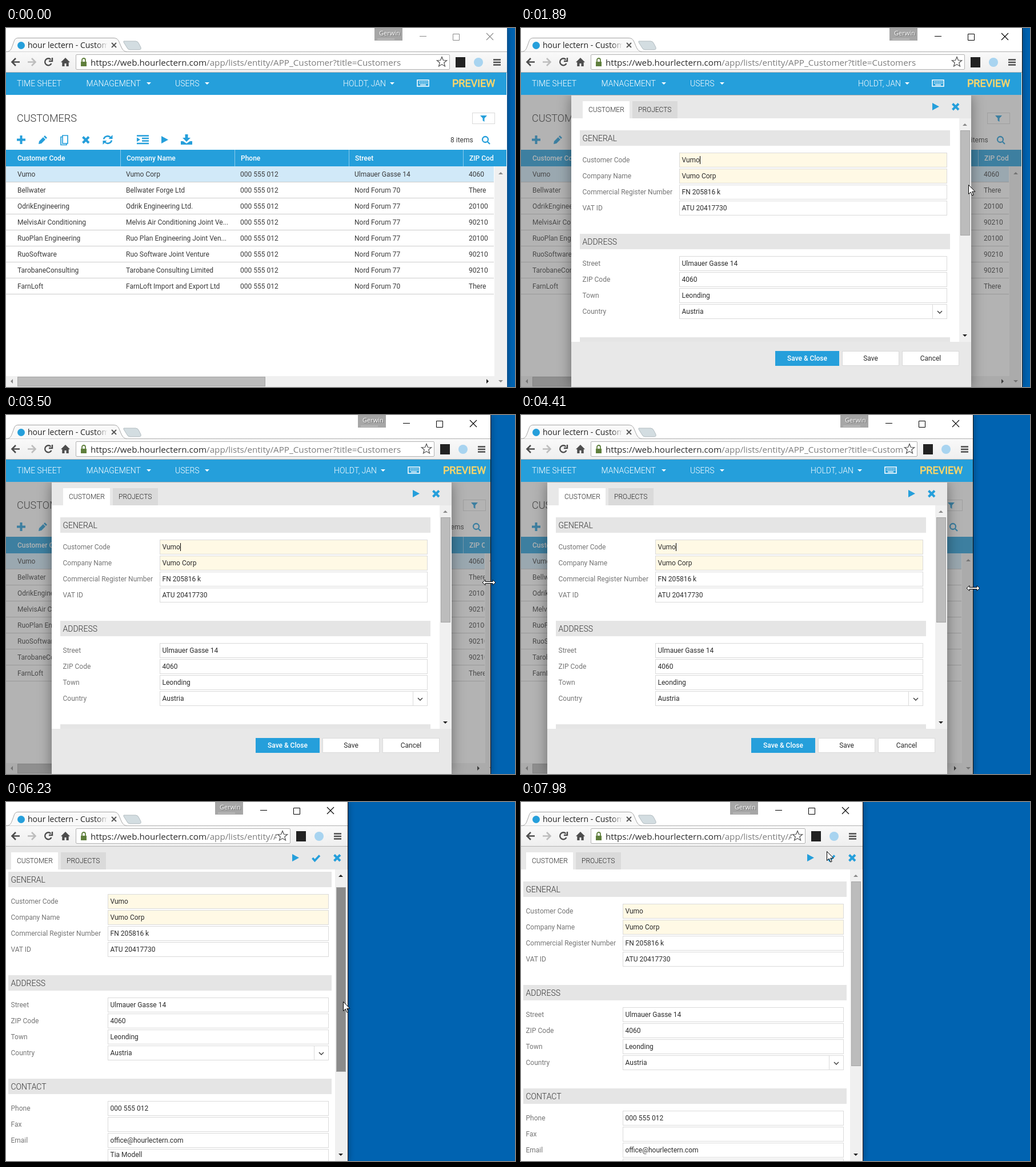
Recreate the animation shown at these times as an HTML page. Size 891 by 628 pixels, loop 8000 ms.

```html
<!DOCTYPE html>
<html lang="en">
<head>
<meta charset="utf-8">
<title>Customer form</title>
<style>
html, body { margin: 0; width: 100%; height: 100%; overflow: hidden; background: #0063b1; }
body { position: relative; font: 12px/20px Roboto, sans-serif; color: #3a3a3a; }
div, span, svg { position: absolute; box-sizing: border-box; }
span { white-space: pre; }
svg { overflow: visible; fill: currentColor; }
svg.line { fill: none; stroke: currentColor; }
.fill { inset: 0; }
.clip { overflow: hidden; }
.blue { color: #259fdb; }
.white { color: #fff; }
.dark { color: #222; }
.grey { color: #555; }
.faint { color: #bdbdbd; }
.pale { color: #a8d4f0; }
.bold { font-weight: 500; }
.nav { font-size: 14px; font-weight: 300; color: #fff; }
.head { font-size: 14px; font-weight: 300; color: #333; }
.title { font-size: 18px; font-weight: 300; color: #333; }
.label { color: #757575; }

#win { left: 0; top: 0; height: 628px; overflow: hidden; background: #fff;
  box-shadow: 1px 0 0 #15528c, 2px 0 9px rgba(0,0,0,.28); }
#win.active { box-shadow: 1px 0 0 #111, 2px 0 10px rgba(0,0,0,.3); }
#controls { color: #8a8a8a; }
.active #controls { color: #000; }
#user { background: #a6a6a6; }
#user span { font: 11px/20px "Open Sans", sans-serif; color: #fff; text-shadow: 1px 1px 1px #666; }
.strip { background: #b5b5b5; }
.rule { background: #b0b0b0; }
.tabShape { fill: #f9f9f9; stroke: #a5a5a5; }
.newTab { fill: #d3dde1; stroke: #b3bcc0; }
.tab { font: 14px/20px "Open Sans", sans-serif; color: #222; width: 140px; overflow: hidden;
  -webkit-mask: linear-gradient(90deg, #000 120px, transparent); mask: linear-gradient(90deg, #000 120px, transparent); }
#tools { left: 0; top: 42px; height: 36px; background: linear-gradient(#f9f9f9, #efefef); border-bottom: 1px solid #b4b4b4; color: #4d4d4d; }
.omni { background: #fff; border: 1px solid #b2b2b2; border-radius: 2px; }
.lock { color: #5f7f3c; }
.url { font: 15.2px/20px "Open Sans", sans-serif; color: #2b2b2b; }
.url i { font-style: normal; color: #7d7d7d; }

#page { left: 0; top: 0; height: 628px; }
.navbar, .thead, .primary { background: #259fdb; }
.preview { font-size: 18px; color: #ffd768; -webkit-text-stroke: .6px #ffd768; }
.keys { stroke-dasharray: 1.6 1.2; }
.row { border-bottom: 1px solid #ccc; }
.row:first-child { background: #d1e9f8; }
.col { background: #8ccbec; }
.track { background: #f0f0f0; color: #888; }
.thumb { background: #bcbcbc; border: 1px solid #a6a6a6; }
.frame { background: #fff; border: 1px solid #dadada; }
.split { background: #dadada; }
#shade { left: 0; right: 0; top: 117px; bottom: 0; background: rgba(90,90,90,.46); }

#modal { bottom: 0; background: #e8e8e8; box-shadow: 0 0 22px rgba(0,0,0,.4); clip-path: inset(0 -40px 0 -40px); }
#body { left: 0; right: 0; top: 40px; bottom: 79px; background: #fff; overflow: hidden; }
#bar { right: 0; width: 21px; top: 0; bottom: 0; }
#thumb { left: 2px; width: 17px; height: 184px; }
#form { left: 0; right: 0; top: 0; }
.tabOn { background: #fff; }
.tabOff { background: #dadada; }
.caption { font-weight: 300; color: #222; }
.band { background: #e5e5e5; }
.need { background: #fff9e5; }
.field, .btn { color: #2c2c2c; }
.btn { text-align: center; line-height: 24px; }
.primary { text-align: center; line-height: 26px; color: #fff; font-weight: 500; }
#tick { display: none; }
.compact #body { bottom: 0; }
.compact #foot { display: none; }
.compact #bar { right: 10px; }
.compact #thumb { height: 323px; }
.compact #tick { display: block; }
.compact #play { margin-left: -38px; }
#caret { display: inline-block; width: 1px; height: 14px; background: #000; vertical-align: -3px; }
#pointer, #resize { left: 0; top: 0; width: 1px; height: 1px; fill: #fff; stroke: #000; }
</style>
</head>
<body>
<script>
// Negative x counts from the right edge; a width of 0 or less is a right inset.
const px = x => x < 0 ? `calc(100% - ${-x}px)` : `${x}px`;
const text = (x, y, s, cls = '') =>
  `<span class="${cls}" style="left:${px(x)};top:${y - 10}px">${s}</span>`;
const box = (x, y, w, h, cls = '', inner = '', id = '') =>
  `<div id="${id}" class="${cls}" style="left:${px(x)};top:${px(y)};${w > 0 ? 'width:' + w : 'right:' + -w}px;height:${h}px">${inner}</div>`;
const icon = (x, y, d, cls = '', stroke = 0, id = '') =>
  `<svg id="${id}" class="${cls}${stroke ? ' line' : ''}" style="left:${px(x)};top:${px(y)}" width="1" height="1" stroke-width="${stroke || 1}"><path d="${d}"/></svg>`;

const PLAY = 'M0 0L12 6.5 0 13z';
const CROSS = 'M1.5 1.5L12 12M12 1.5L1.5 12';
const DOWN = 'M0 0h8l-4 4z';
const UP = 'M0 4h8L4 0z';

function chrome() {
  const controls =
    icon(-153, 15, 'M0 -.5h12', '', 1) +
    icon(-95, 10, 'M.5 .5h11v11h-11z', '', 1) +
    icon(-36, 9, 'M0 0l12 12M12 0L0 12', '', 1.1);
  const tools =
    icon(9, 10, 'M15 7.5H2M8 1L1.5 7.5 8 14', '', 2.6) +
    icon(38, 10, 'M0 7.5h13M7 1l6.5 6.5L7 14', 'faint', 2.6) +
    icon(67, 10, 'M12.5 10A6 6 0 1 1 11.5 3.2M14 0v6H8', '', 2.4) +
    icon(96, 10, 'M8 0l8 8h-2.3v7H9.5v-5h-3v5H2.3V8H0z') +
    box(122, 4, -100, 27, 'omni') +
    icon(131, 10, 'M0 7h10v8H0z', 'lock') +
    icon(131, 10, 'M2 7V4a3 3 0 0 1 6 0v3', 'lock', 1.8) +
    box(148, 5, -124, 25, 'clip', text(0, 12.5,
      'https://web.hourlectern.com<i>/app/lists/entity/APP_Customer?title=Customers</i>', 'url')) +
    icon(-114, 17, 'M0 -8.5l2.4 6 6.3.3-4.9 4 1.7 6.2L0 4.6-5.5 8l1.7-6.2-4.9-4 6.3-.3z', '', 1.2) +
    icon(-90, 9, 'M0 0h17v18H0z', 'dark') +
    icon(-58, 17.5, 'M0 0a8 8 0 1 0 16 0a8 8 0 1 0-16 0', 'pale') +
    icon(-24, 12, 'M0 1.5h13M0 6h13M0 10.5h13', '', 2.6);
  return box(0, 41, 0, 1, 'rule') +
    icon(0, 17, 'M0 24.5C8 24.5 9 20 12 12S15 .5 22 .5H188C196 .5 197 5 200 12S205 24.5 212 24.5', 'tabShape') +
    icon(205, 22, 'M1 1h21q4 0 6 5l3 6q1 4-3 4H12q-4 0-6-5L1 3z', 'newTab') +
    icon(20, 23.5, 'M0 6.5a6.5 6.5 0 1 0 13 0a6.5 6.5 0 1 0-13 0', 'blue') +
    text(38, 30, 'hour lectern - Customers', 'tab') +
    icon(185, 26, 'M0 0l8 8M8 0L0 8', 'grey', 1.8) +
    box(-232, 0, 49, 22, '', box(5, 18, 30, 3, 'strip') + text(8, 9, 'Gerwin'), 'user') +
    `<div id="controls" class="fill">${controls}</div><div id="tools">${tools}</div>`;
}

function nav() {
  const user = 'HOLDT, JAN';
  const wide = text(19, 97, 'TIME SHEET', 'nav') +
    text(140.5, 97, 'MANAGEMENT', 'nav') + icon(246, 95, DOWN, 'white') +
    text(296, 97, 'USERS', 'nav') + icon(348, 95, DOWN, 'white') +
    text(-286, 97, user, 'nav') + icon(-204, 95, DOWN, 'white') +
    icon(-157, 90, 'M1 1h20v11H1z', 'white', 1.6) +
    icon(-157, 90, 'M4 4h15M4 6.7h15', 'white keys', 1.6) +
    icon(-157, 90, 'M6 9.5h10', 'white', 1.6) +
    text(-95, 97, 'PREVIEW', 'preview');
  const narrow = icon(19, 92, 'M0 1.2h12M0 5.2h12M0 9.2h12', 'white', 2) +
    text(-110, 97, user, 'nav') + icon(-27, 95, DOWN, 'white');
  return box(0, 78, 0, 39, 'navbar') +
    `<div id="wide" class="fill">${wide}</div><div id="narrow" class="fill">${narrow}</div>`;
}

function list() {
  const phone = '000 555 012', s70 = 'Nord Forum 70', s77 = 'Nord Forum 77';
  const rows = [
    ['Vumo', 'Vumo Corp', 'Ulmauer Gasse 14', '4060'],
    ['Bellwater', 'Bellwater Forge Ltd', s70, 'There'],
    ['OdrikEngineering', 'Odrik Engineering Ltd.', s77, '20100'],
    ['MelvisAir Conditioning', 'Melvis Air Conditioning Joint Ve...', s77, '90210'],
    ['RuoPlan Engineering', 'Ruo Plan Engineering Joint Ven...', s77, '20100'],
    ['RuoSoftware', 'Ruo Software Joint Venture', s77, '90210'],
    ['TarobaneConsulting', 'Tarobane Consulting Limited', s77, '90210'],
    ['FarnLoft', 'FarnLoft Import and Export Ltd', s70, 'There'],
  ];
  const cells = ([code, name, street, zip], i) => box(0, 28 * i, 0, 28, 'row',
    [code, name, phone, street, zip].map((s, c) => text(c ? 10 + 200 * c : 20, 14, s)).join(''));
  const heads = ['Customer Code', 'Company Name', 'Phone', 'Street', 'ZIP Code'].map((s, c) =>
    text(c ? 11 + 200 * c : 20, 15, s, 'white bold') + (c ? box(200 * c, 0, 1, 29, 'col') : '')).join('');
  return text(19, 158, 'CUSTOMERS', 'title') +
    box(-60, 148, 40, 20, 'frame') + icon(-46, 153, 'M0 0h12L7.5 5v6l-3-2V5z', 'blue') +
    icon(19, 188, 'M0 7.5h15M7.5 0v15', 'blue', 4) +
    icon(57, 188, 'M0 15l1-5 7-7 4 4-7 7zM9 2l2-2 4 4-2 2z', 'blue') +
    icon(95, 187, 'M4 1h9v14H4zM4 3.5H1V17.5h10V15', 'blue', 1.7) +
    icon(133, 189, CROSS, 'blue', 4) +
    icon(169, 187, 'M2 7.5A7 7 0 0 1 14 4.5M16 9.5A7 7 0 0 1 4 12.5', 'blue', 2.6) +
    icon(169, 187, 'M17.5 0v7h-7zM.5 17v-7h7z', 'blue') +
    icon(229, 187, 'M0 1.5h21M9 6h12M9 10.5h12M0 15h21', 'blue', 2.6) +
    icon(229, 187, 'M0 4.5l6 3.8-6 3.8z', 'blue') +
    icon(272, 189, PLAY, 'blue') +
    icon(306, 186, 'M7.5 0h5v6h4.5l-7 7-7-7h4.5zM0 12h4l6 4 6-4h4v6H0z', 'blue') +
    text(-98, 196, '8 items') +
    icon(-43, 189, 'M11 6a5 5 0 1 1-10 0a5 5 0 1 1 10 0M9.5 9.5L14 14', 'blue', 2.3) +
    box(0, 213, 0, 29, 'thead', box(0, 0, -22, 29, 'clip', heads)) +
    box(0, 242, -22, 367, 'clip', rows.map(cells).join('')) +
    box(-21, 242, 21, 386, 'track', icon(7, 10, UP) + icon(7, 374, DOWN)) +
    box(0, 609, -21, 19, 'track', icon(8, 5, 'M4 0v8L0 4z') +
      box(20, 1, 434, 17, 'thumb') + icon(-14, 5, 'M0 0v8l4-4z', 'dark'));
}

function form() {
  const sections = [
    ['GENERAL', [['Customer Code', 'Vumo<i id="caret"></i>'], ['Company Name', 'Vumo Corp'],
      ['Commercial Register Number', 'FN 205816 k'], ['VAT ID', 'ATU 20417730']]],
    ['ADDRESS', [['Street', 'Ulmauer Gasse 14'], ['ZIP Code', '4060'], ['Town', 'Leonding'], ['Country', 'Austria']]],
    ['CONTACT', [['Phone', '000 555 012'], ['Fax', ''], ['Email', 'office@hourlectern.com'], ['', 'Tia Modell']]],
  ];
  return sections.map(([name, fields], s) => {
    const top = 21 + 181 * s;
    return box(15, top, -37, 27, 'band') + text(19.5, top + 14, name, 'head') +
      fields.map(([label, value], i) => {
        const y = top + 39 + 28 * i;
        const required = s === 0 && i < 2;
        return text(19.5, y + 13, label, 'label') +
          box(189, y, -42, label ? 26 : 80, required ? 'frame need' : 'frame',
            text(3.5, label ? 12 : 9, value, 'field') + (label === 'Country'
              ? box(-25, 0, 1, 24, 'split') + icon(-16, 11, 'M0 0l4 4 4-4', '', 1.4) : ''));
      }).join('');
  }).join('');
}

function modal() {
  return `<div id="body"><div id="content" class="fill"><div id="form">${form()}</div>
    <div id="bar" class="track">${icon(6, 9, UP, '', 0, 'up')}${icon(6, -13, DOWN, 'dark')}<div id="thumb" class="thumb"></div></div></div></div>
    <div id="extras" class="fill">` +
    box(20, 10, 82, 30, 'tabOn') + text(30, 25, 'CUSTOMER', 'caption') +
    box(107, 10, 79, 30, 'tabOff') + text(117, 25, 'PROJECTS', 'caption') +
    icon(-68, 13, PLAY, 'blue', 0, 'play') +
    icon(-72, 14, 'M1.5 6l4 4.5L14 1.5', 'blue', 3.6, 'tick') +
    icon(-34, 13, CROSS, 'blue', 4) +
    '<div id="foot" class="fill">' +
    box(-343, 447, 112, 26, 'primary', 'Save &amp; Close') +
    box(-226, 447, 100, 26, 'frame btn', 'Save') +
    box(-121, 447, 100, 26, 'frame btn', 'Cancel') + '</div></div>';
}

document.body.insertAdjacentHTML('beforeend',
  `<div id="win">${chrome()}<div id="page">${nav()}${list()}<div id="shade"></div><div id="modal">${modal()}</div></div></div>
  <svg id="pointer"><path d="M.5 .5v16l3.7-3.5 2.6 6 2.4-1-2.5-5.8h5.2z"/></svg>
  <svg id="resize"><path d="M-11.5 0l5-4.5v3h13v-3l5 4.5-5 4.5v-3h-13v3z"/></svg>`);

const LOOP = 8000, STEP = 70;
const widths = [[3290, 877], [3360, 872], [3430, 861], [3490, 850], [3500, 848], [3990, 794], [4400, 794],
  [4410, 791], [4970, 604], [5030, 600], [5040, 598]];
const path = [[70, 708, 472], [560, 430, 190], [840, 403, 250], [1330, 403, 250], [1890, 783, 274],
  [2100, 844, 288], [2310, 877, 292], [3290, 877, 292], [3500, 845.5, 293], [3990, 794, 302], [4340, 794, 302],
  [4410, 791.5, 303], [5040, 598, 357], [5810, 598, 357], [5880, 598, 350], [6020, 591, 338], [6090, 590, 338],
  [6230, 590, 349], [6440, 602, 388], [6650, 606, 338], [6930, 612, 226], [7000, 612, 226],
  [7350, 470, 110], [7500, 490, 75], [7770, 538, 106], [7840, 537, 98], [7980, 535, 86]];
const blink = [[1470, 2030], [2520, 3010], [3360, 4900]];

function at(keys, t) {
  const i = keys.findIndex(k => k[0] > t);
  if (i === 0) return keys[0].slice(1);
  if (i < 0) return keys[keys.length - 1].slice(1);
  const a = keys[i - 1], b = keys[i], f = (t - a[0]) / (b[0] - a[0]);
  return a.slice(1).map((v, n) => v + (b[n + 1] - v) * f);
}

const el = id => document.getElementById(id);
const show = (id, on) => { el(id).style.visibility = on ? 'visible' : 'hidden'; };
const width = t => Math.round(at(widths, t)[0]);

function draw(t) {
  // Page content lays out slightly after the window frame.
  const page = width(t - 70) - 1;
  const full = page < 768, compact = page < 600;
  el('win').style.width = width(t) + 'px';
  el('win').classList.toggle('active', t >= 980);
  el('tools').style.width = width(t - 10) + 'px';
  el('page').style.width = page + 'px';
  show('wide', !full);
  show('narrow', full);

  const left = compact ? -11 : full ? -1 : Math.floor(page / 2) - 350;
  const right = compact ? page + 10 : full ? page : left + 700;
  const m = el('modal');
  m.style.left = left + 'px';
  m.style.width = right - left + 'px';
  m.style.top = compact ? '78px' : '118px';
  m.classList.toggle('compact', compact);
  m.style.display = el('shade').style.display = t < 1190 ? 'none' : 'block';
  show('content', t >= 1330);
  show('extras', t >= 1330);
  show('caret', blink.some(([a, b]) => t >= a && t < b));

  const [x, y] = at(path, t);
  const drag = t >= 6090 && t < 7000;
  const offset = drag ? Math.max(0, Math.round(y - 339)) : 0;
  el('form').style.top = -Math.round(offset * 1.65) + 'px';
  el('thumb').style.top = 21 + offset + 'px';
  el('thumb').style.background = drag ? '#8b8b8b' : t >= 5950 && t < 6090 ? '#a6a6a6' : '';
  el('up').style.color = offset ? '#222' : '';

  const sizing = t >= 2240 && t < 5880;
  show('pointer', t >= 70 && !sizing);
  show('resize', sizing);
  el(sizing ? 'resize' : 'pointer').style.transform = `translate(${x}px,${y}px)`;
}

function tick() {
  const t = performance.now() % LOOP;
  draw(Math.floor(t / STEP) * STEP);
  requestAnimationFrame(tick);
}
tick();
</script>
</body>
</html>
```
